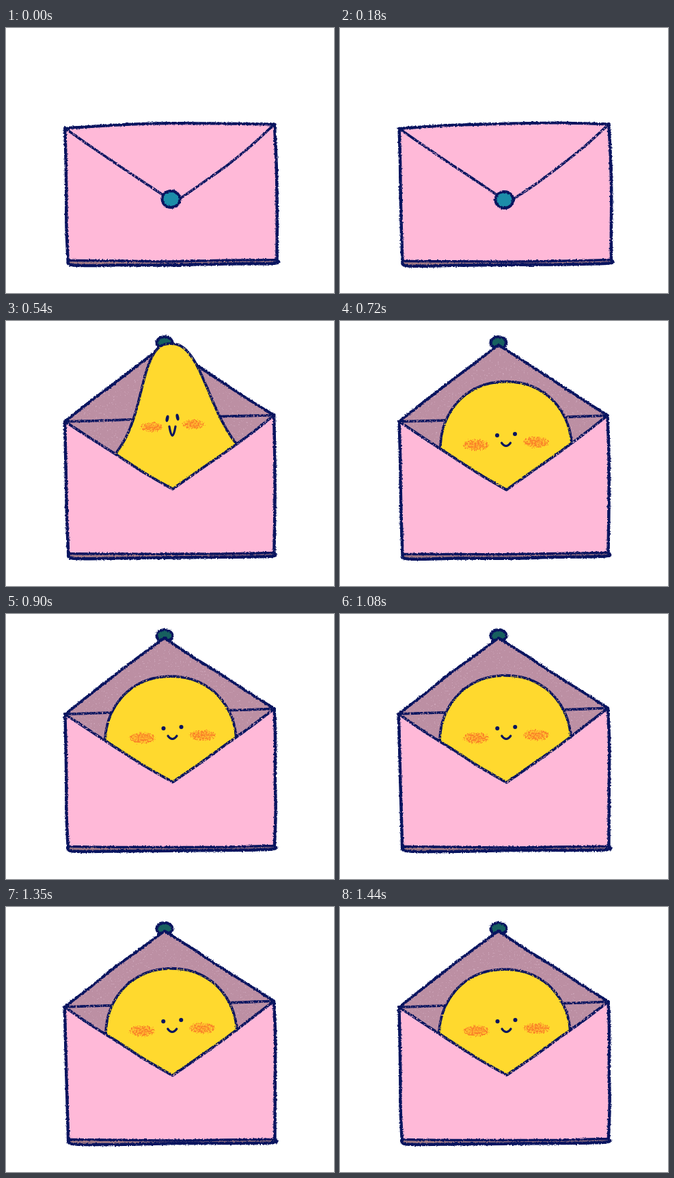
An HTML page for the animation above (1530 ms loop, 480 px wide and 387 px high).

```html
<!DOCTYPE html>
<html lang="en">
<head>
<meta charset="utf-8">
<title>Envelope</title>
<style>
html, body { margin: 0; width: 100%; height: 100%; overflow: hidden; background: #fff; }
svg { display: block; width: 100vw; height: 100vh; }
.ink { fill: none; stroke: #08145f; stroke-linecap: round; stroke-linejoin: round; }
</style>
</head>
<body>
<svg viewBox="0 0 480 387" xmlns="http://www.w3.org/2000/svg">
  <defs id="defs"></defs>
  <g id="art"></g>
</svg>
<script>
const STEP = 90, COUNT = 17;
const PINK = '#ffb9d8', BACK = '#bc8fa3', STRIP = '#a27a84', YELLOW = '#ffd92e', NAVY = '#08145f';

// Crayon filters: rough edges, plus optional holes cut by thresholded noise.
function filter(id, scale, gain, bias) {
  const box = 'x="0" y="0" width="480" height="387" filterUnits="userSpaceOnUse" color-interpolation-filters="sRGB"';
  const holes = gain ? `
    <feColorMatrix in="n" values="0 0 0 0 0  0 0 0 0 0  0 0 0 0 0  0 0 0 ${gain} ${bias}" result="m"/>
    <feComposite in="d" in2="m" operator="in"/>` : '';
  return `<filter id="${id}" ${box}>
    <feTurbulence type="fractalNoise" baseFrequency="0.42" numOctaves="2" result="n"/>
    <feDisplacementMap in="SourceGraphic" in2="n" scale="${scale}" xChannelSelector="R" yChannelSelector="G" result="d"/>${holes}
  </filter>`;
}
const defs = document.getElementById('defs');
defs.innerHTML = filter('rough', 3.4) + filter('chalk', 2, 5, -1.3) +
  filter('dust', 2, 9, -5.9) + filter('grain', 6, 6, -2.5) +
  `<radialGradient id="blush"><stop offset=".4" stop-color="#ff9a30" stop-opacity=".6"/>
   <stop offset="1" stop-color="#ff9a30" stop-opacity="0"/></radialGradient>`;
const noises = [...defs.querySelectorAll('feTurbulence')];
const art = document.getElementById('art');

const hash = (x, y, k) => {
  const s = Math.sin(x * 12.99 + y * 78.23 + k * 37.7) * 43758.55;
  return s - Math.floor(s) - 0.5;
};
const lerp = (a, b, t) => a + (b - a) * t;
const jig = ([x, y], k, amp = 1.4) => [x + amp * hash(x, y, k), y + amp * hash(y, x, k)];

// Hand-drawn line from a to b, pushed by (bx, by) in its middle.
function edge(a, b, k, bx = 0, by = 0) {
  return [0, 1, 2, 3, 4].map(n => {
    const t = n / 4, bow = 4 * t * (1 - t);
    const p = [lerp(a[0], b[0], t) + bx * bow, lerp(a[1], b[1], t) + by * bow];
    return n % 4 ? jig(p, k) : p;
  });
}
function curve(pts, join) {
  let d = (join ? 'L' : 'M') + pts[0];
  for (let i = 0; i < pts.length - 1; i++) {
    const a = pts[i - 1] || pts[i], b = pts[i], c = pts[i + 1], e = pts[i + 2] || c;
    d += `C${b[0] + (c[0] - a[0]) / 6},${b[1] + (c[1] - a[1]) / 6} ` +
      `${c[0] - (e[0] - b[0]) / 6},${c[1] - (e[1] - b[1]) / 6} ${c}`;
  }
  return d;
}
const chain = (...parts) => parts.map((p, i) => curve(p, i)).join('');
const fill = (d, color, extra = '') => `<path d="${d}" fill="${color}" ${extra}/>`;
const ink = (d, width) => `<path class="ink" d="${d}" stroke-width="${width}"/>`;
const oval = (x, y, rx, ry, color, extra = '') =>
  `<ellipse cx="${x}" cy="${y}" rx="${rx}" ry="${ry}" fill="${color}" ${extra}/>`;
const layer = (name, body) => `<g filter="url(#${name})">${body}</g>`;
const outlined = `stroke="${NAVY}" stroke-width="4"`;

// Sides and bottom strip shared by the shut and the open envelope.
function makeBox(k, tr, br) {
  const tl = jig([86, 146.5], k), bl = jig([91, 340], k);
  tr = jig(tr, k);
  br = jig(br, k);
  const under = edge([br[0] - 4, br[1] + 5], [bl[0] + 9, bl[1] + 7], k, 0, 0.5);
  return {
    tl, tr,
    right: edge(tr, br, k, 1.5),
    inner: edge(br, bl, k, 0, 1.5),
    outer: [br, ...under, bl],
    left: edge(bl, tl, k, -0.5)
  };
}
const boxBody = (b, ...upper) =>
  fill(chain(b.inner, b.outer.slice().reverse()), STRIP) +
  fill(chain(...upper, b.right, b.inner, b.left), PINK);
const boxLines = b =>
  layer('rough', ink(chain(b.right, b.outer, b.left), 4.5) + ink(curve(b.inner), 3.5));

function drawShut(k) {
  const b = makeBox(k, [393, 140], [397, 339]), top = edge(b.tl, b.tr, k, 0, -4);
  const flap = curve(edge(b.tl, [230, 244], k, 0, 0.5)) + curve(edge(b.tr, [255, 249], k, 0, 5));
  return boxBody(b, top) + layer('chalk', ink(flap, 3.8)) +
    boxLines(b) + layer('rough', ink(curve(top), 4.2)) +
    layer('rough', oval(241.5 - k / 2, 250 + k / 2, 13, 12, '#1c8da9', outlined));
}

// s runs from 0, a round dome, to 1, a stretched bell.
function bodyShape(s, dx, dy) {
  const top = lerp(91, 33, s), pts = [];
  for (let n = -14; n <= 14; n++) {
    const u = (n / 14) ** 2, v = Math.min(1, u * 1.08);
    const dome = 96 * (v * (2 - v)) ** 0.47;
    const bell = 68 * u ** 0.4 + 27 * u ** 4;
    pts.push([241 + 14 * s * u + Math.sign(n) * lerp(dome, bell, s) + dx, lerp(top, 195, u) + dy]);
  }
  return curve(pts);
}

function drawFace(s, shift) {
  const x = 243.5, sides = [-1, 1];
  const cheek = (side, color) => oval(x + side * lerp(44, 30.5, s), lerp(179, 153, s) - 2 * side,
    lerp(19, 16, s), lerp(8, 7, s), color);
  const eye = side => {
    const ex = x + side * lerp(13, 7.5, s), ey = lerp(166, 141.5, s) - side;
    return oval(ex, ey, lerp(3, 2.3, s), lerp(3, 5, s), NAVY, `transform="rotate(${-12 * s * side} ${ex} ${ey})"`);
  };
  const w = lerp(6.5, 4.5, s), y = lerp(178, 154, s);
  const mouth = `M${x - w} ${y}Q${x} ${y + lerp(9, 27, s)} ${x + w} ${y}`;
  return `<g transform="translate(${shift} 0)">` +
    sides.map(d => cheek(d, 'url(#blush)')).join('') +
    layer('grain', sides.map(d => cheek(d, '#fa8428')).join('')) +
    sides.map(eye).join('') + ink(mouth, 3.2) + '</g>';
}

function drawOpen(k, s, dx = 0, dy = 0) {
  const b = makeBox(k, [392, 138], [393, 339]), apex = [232, 35], tip = jig([243.5, 246], k);
  const flapL = edge(b.tl, apex, k, 0, -1), flapR = edge(apex, b.tr, k);
  const vL = edge(b.tl, tip, k, 0, 2), vR = edge(tip, b.tr, k, 0, 2);
  const flap = chain(flapL, flapR), back = flap + 'L244,250Z', body = bodyShape(s, dx, dy);
  return layer('rough', oval(232, 31.5, 11.5, 8.5, '#17605f', outlined)) +
    fill(back, BACK) + layer('dust', fill(back, '#d9b4c8', 'opacity=".6"')) +
    layer('rough', ink(flap, 4)) + layer('chalk', ink(curve(edge(b.tl, b.tr, k)), 3.8)) +
    fill(body + 'L244,300Z', YELLOW) + layer('chalk', ink(body, 3.8)) + drawFace(s, -dx / 4) +
    boxBody(b, vL, vR) + layer('chalk', ink(chain(vL, vR), 4)) + boxLines(b);
}

function draw(i) {
  if (i < 6) return drawShut(i % 3);
  if (i < 8) return drawOpen(i, i === 6 ? 1 : 0.5);
  const k = (19 - i) % 3;
  return drawOpen(k, 0, k, -1.25 * k);
}

const start = performance.now();
let shown = -1;
function update() {
  const i = Math.floor((performance.now() - start) / STEP) % COUNT;
  if (i !== shown) {
    shown = i;
    const seed = 1 + (i < 8 ? i % 3 : 3 + (i - 8) % 3);
    noises.forEach(n => n.setAttribute('seed', seed));
    art.innerHTML = draw(i);
  }
  requestAnimationFrame(update);
}
update();
</script>
</body>
</html>
```
